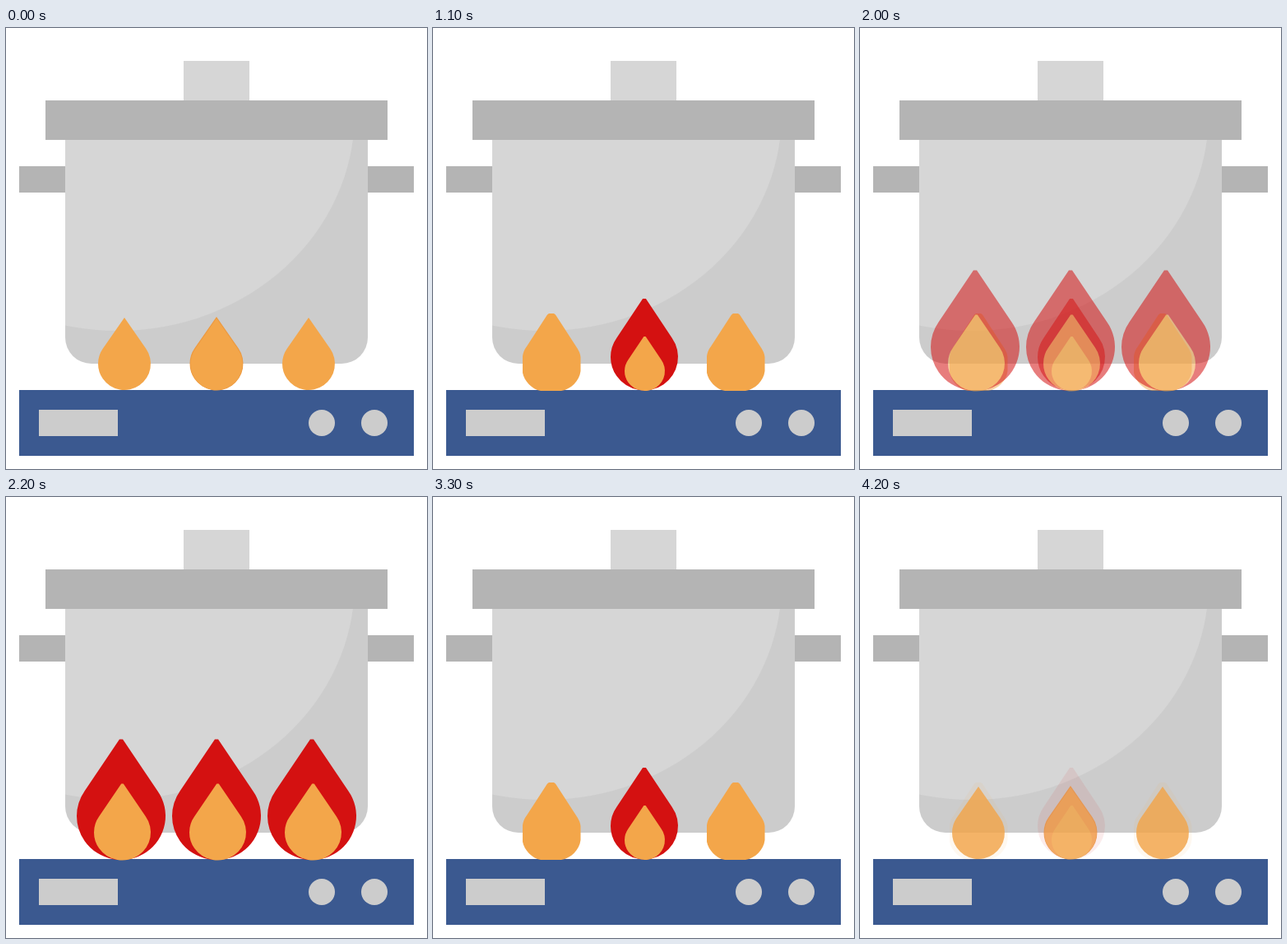
These frames come from a looping animation (512x536 px, 4.4 s). An HTML page with a canvas:

```html
<!DOCTYPE html>
<html lang="en">
<head>
<meta charset="utf-8">
<title>Pot on a stove</title>
<style>
  html, body { margin: 0; width: 100%; height: 100%; overflow: hidden; background: #fff; }
  canvas { display: block; }
</style>
</head>
<body>
<canvas id="stage" width="512" height="536"></canvas>
<script>
const W = 512, H = 536, LOOP = 4400;
const ORANGE = '#f3a64a', RED = '#d41111';
const ctx = document.getElementById('stage').getContext('2d');

function layer(paint) {
  const canvas = document.createElement('canvas');
  canvas.width = W;
  canvas.height = H;
  paint(canvas.getContext('2d'));
  return canvas;
}

function rect(c, color, x, y, w, h) {
  c.fillStyle = color;
  c.fillRect(x, y, w, h);
}

function disc(c, color, x, y, r) {
  c.fillStyle = color;
  c.beginPath();
  c.arc(x, y, r, 0, Math.PI * 2);
  c.fill();
}

// A circle with two tangents meeting at the tip; blunt is half the tip width.
function drop(c, color, cx, top, width, bottom, blunt = 0) {
  const tangent = Math.asin(32 / 56);
  c.save();
  c.translate(cx, top);
  c.scale(width / 64, (bottom - top) / 88);
  c.beginPath();
  c.moveTo(-blunt, 0);
  c.lineTo(blunt, 0);
  c.arc(0, 56, 32, -tangent, Math.PI + tangent);
  c.closePath();
  c.restore();
  c.fillStyle = color;
  c.fill();
}

// Medium side flame with a flattened tip and base.
function squatDrop(c, cx) {
  c.save();
  c.translate(cx, 0);
  c.beginPath();
  c.moveTo(-3, 347);
  c.lineTo(3, 347);
  c.quadraticCurveTo(5, 348, 6, 350);
  c.lineTo(30, 387);
  c.quadraticCurveTo(35, 394, 35.5, 400);
  c.lineTo(35.5, 417);
  c.bezierCurveTo(34, 429, 24, 439, 12, 441);
  c.lineTo(-13, 441);
  c.bezierCurveTo(-24, 439, -33, 429, -35, 419);
  c.lineTo(-35, 399);
  c.quadraticCurveTo(-34, 392, -30, 387);
  c.lineTo(-6, 350);
  c.quadraticCurveTo(-5, 348, -3, 347);
  c.fillStyle = ORANGE;
  c.fill();
  c.restore();
}

const scene = layer(c => {
  rect(c, '#fff', 0, 0, W, H);
  rect(c, '#d6d6d6', 216, 40, 80, 48);
  rect(c, '#b4b4b4', 16, 168, 480, 32);
  c.save();
  c.beginPath();
  c.roundRect(72, 136, 368, 272, [0, 0, 32, 32]);
  c.fillStyle = '#ccc';
  c.fill();
  c.clip();
  c.beginPath();
  c.ellipse(136, 104, 288, 264, 0, 0, Math.PI * 2);
  c.fillStyle = '#d6d6d6';
  c.fill();
  c.restore();
  rect(c, '#b4b4b4', 48, 88, 416, 48);
  rect(c, '#3b5990', 16, 440, 480, 80);
  rect(c, '#ccc', 40, 464, 96, 32);
  disc(c, '#ccc', 384, 480, 16);
  disc(c, '#ccc', 448, 480, 16);
});

const low = layer(c => {
  for (const x of [144, 256, 368]) drop(c, ORANGE, x, 352, 64, 440);
  drop(c, '#ec9a42', 256, 351, 65, 440.5);
  drop(c, ORANGE, 256, 353, 63, 440);
});

const medium = layer(c => {
  squatDrop(c, 144);
  squatDrop(c, 368);
  drop(c, RED, 257, 329, 82, 440.5, 1.5);
  drop(c, ORANGE, 257.5, 375, 49, 441, 1.5);
});

const high = layer(c => {
  for (const x of [140, 256, 372]) {
    drop(c, RED, x, 294.5, 108, 441, 1.2);
    drop(c, ORANGE, x + 1.5, 348.5, 69, 441.5, 1.2);
  }
});

const flames = [low, medium, high];

// Opacity of the smaller and the larger flames at each quarter of a fade.
const FADE_OUT = [1, 0.82, 0.71, 0.5];
const FADE_IN = [0, 0.075, 0.23, 0.54];

// Heat in quarter steps: up to 8 and back, resting on each full level.
function heatAt(time) {
  let end = 0;
  for (let i = 0; i < 16; i++) {
    end += i % 4 ? 200 : 500;
    if (time < end) return i <= 8 ? i : 16 - i;
  }
  return 0;
}

function show(index, alpha) {
  if (!alpha) return;
  ctx.globalAlpha = alpha;
  ctx.drawImage(flames[index], 0, 0);
}

function render(time) {
  const heat = heatAt(time % LOOP);
  const level = Math.floor(heat / 4), step = heat % 4;
  ctx.globalAlpha = 1;
  ctx.drawImage(scene, 0, 0);
  show(level, FADE_OUT[step]);
  show(level + 1, FADE_IN[step]);
}

const start = performance.now();
function tick() {
  render(performance.now() - start);
  requestAnimationFrame(tick);
}
tick();
</script>
</body>
</html>
```
